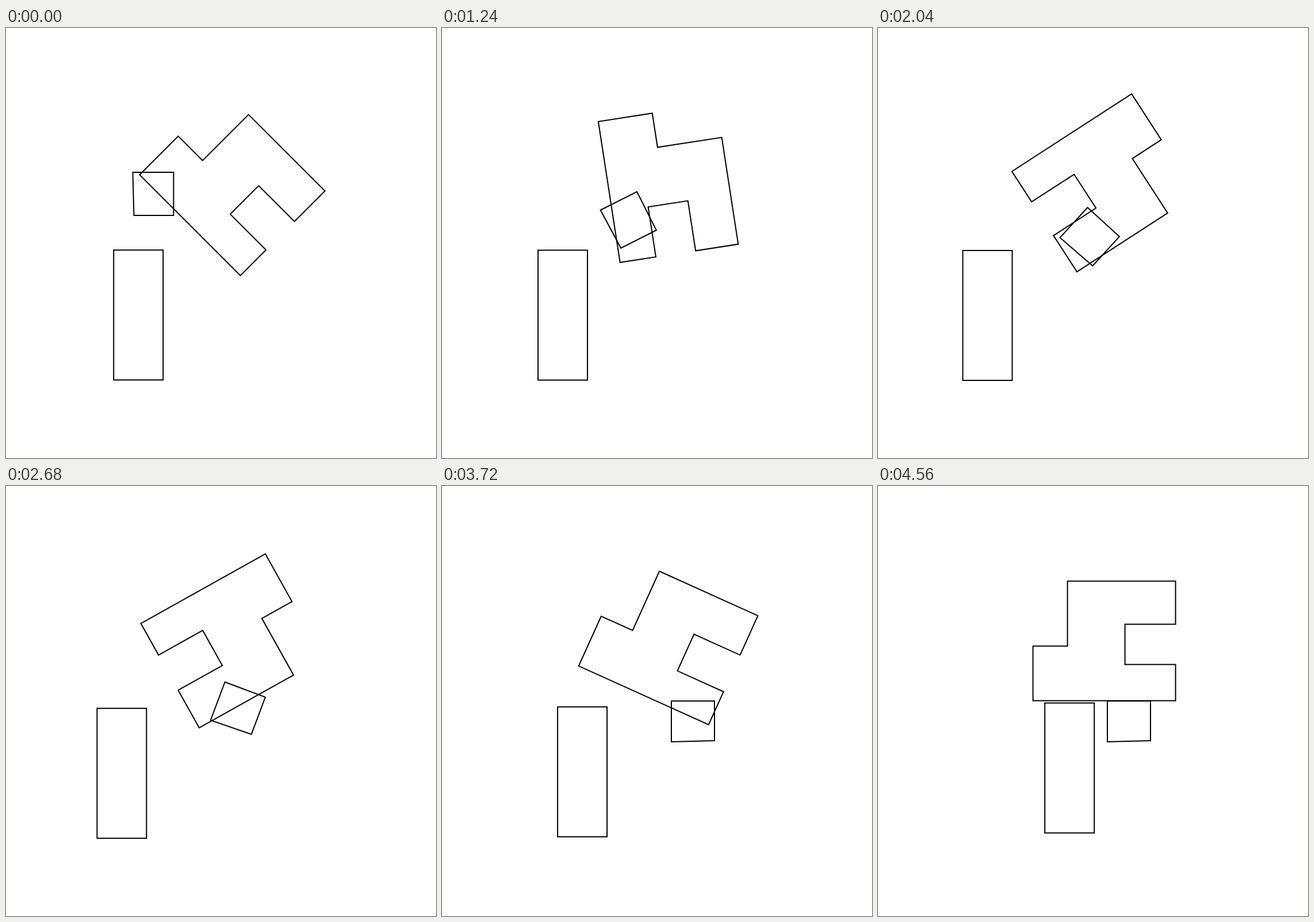
Write an HTML page with a canvas that moves like this. It is 748 px wide and 748 px high and loops after 4.6 s.

```html
<!DOCTYPE html>
<html lang="en">
<head>
<meta charset="utf-8">
<title>Assembling shapes</title>
<style>
  html, body { margin: 0; height: 100%; overflow: hidden; background: #fff; }
  canvas { display: block; }
</style>
</head>
<body>
<canvas id="stage" width="748" height="748"></canvas>
<script>
const ctx = document.getElementById('stage').getContext('2d');
const LOOP = 4600, STEP = 40;

// Outlines relative to their pivots
const block = new Path2D('M-64-104H124V-29H36V41H124V104H-124V9H-64Z');
const square = new Path2D('M-37.5-35.5H37.5V33.5L-37.5 35.5Z');
const bar = new Path2D('M0 0H86V226H0Z');

// Linear rise from 0 to 1 between two times
const ramp = (t, from, to) => Math.min(1, Math.max(0, (t - from) / (to - from)));

function outline(path, x, y, degrees = 0) {
  ctx.save();
  ctx.translate(x, y);
  ctx.rotate(degrees * Math.PI / 180);
  ctx.stroke(path);
  ctx.restore();
}

function draw(now) {
  const t = Math.floor(now % LOOP / STEP) * STEP;
  ctx.clearRect(0, 0, 748, 748);
  ctx.lineWidth = 2;

  // Turns to upside down, then back upright
  outline(block, 393.6, 269.4, 45 + 135 * ramp(t, 800, 2440) - 180 * ramp(t, 2440, 3920));

  // Slides diagonally into place while its turn speeds up
  const slide = ramp(t, 0, 3280);
  outline(square, 256 + 180.5 * slide, 288.5 + 121 * slide,
    90 - 38 * ramp(t, 0, 1760) - 52 * ramp(t, 1760, 3280));

  // Drifts left, eases back, then moves under the block
  const away = ramp(t, 480, 2000), back = ramp(t, 2000, 3440), dock = ramp(t, 3440, 4560);
  outline(bar, 187.3 - 40.5 * away + 24.6 * back + 118.8 * dock,
    386.2 + 0.8 * away - 0.6 * back - 8.8 * dock);
}

const start = performance.now();
(function tick() {
  draw(performance.now() - start);
  requestAnimationFrame(tick);
})();
</script>
</body>
</html>
```
